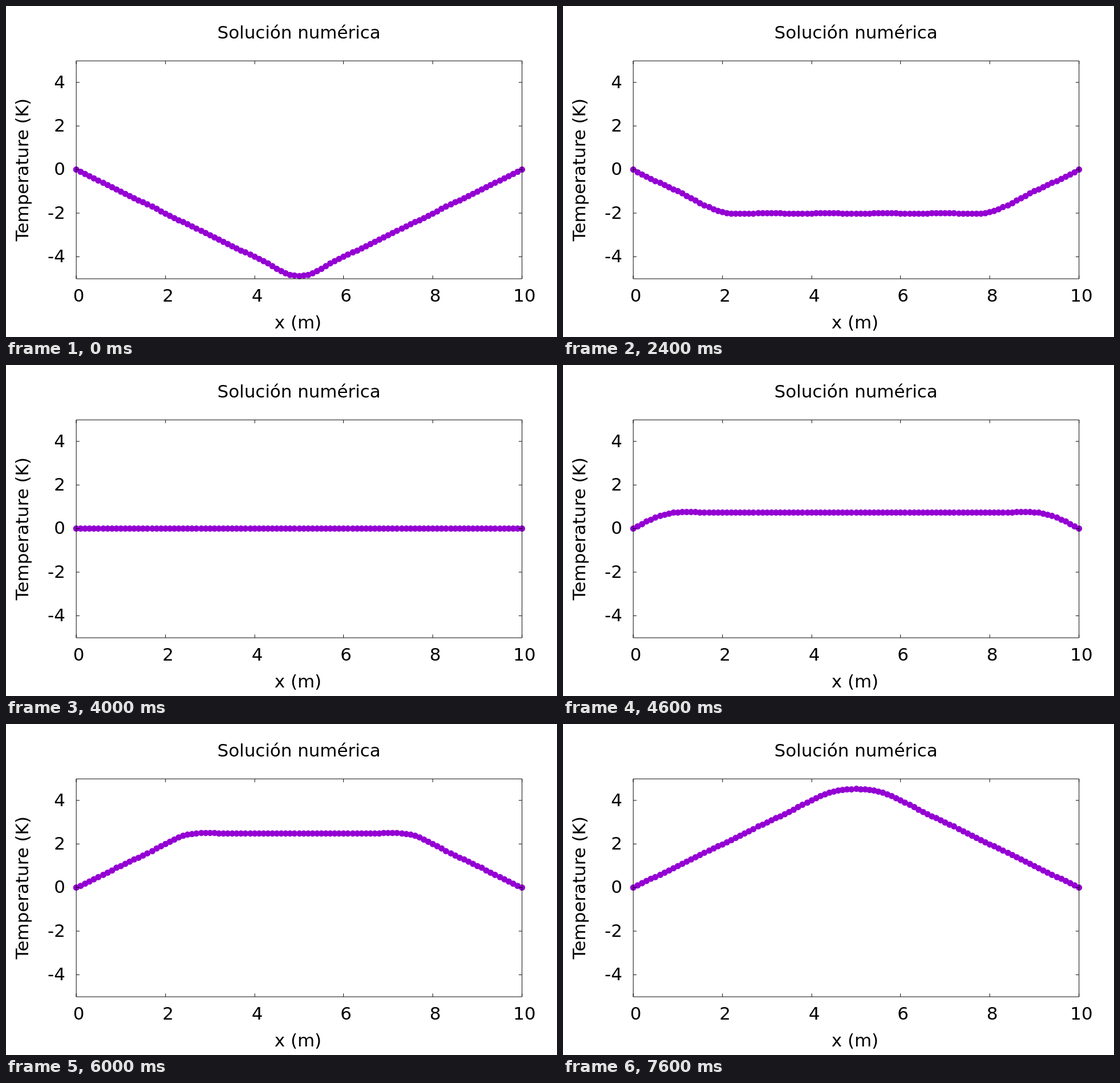
These frames come from a looping animation (966 px wide and 580 px high, 7.8 s). An HTML page:

```html
<!DOCTYPE html>
<html lang="es">
<head>
<meta charset="utf-8">
<title>Solución numérica</title>
<style>
  html, body { margin: 0; width: 100%; height: 100%; overflow: hidden; background: #fff; }
  svg { display: block; }
  text { font: 32px "DejaVu Sans", sans-serif; fill: #000; text-anchor: middle; }
  #dots { fill: #9400d3; }
  #axes { fill: none; stroke: #000; stroke-width: 1; }
</style>
</head>
<body>
<svg width="966" height="580" viewBox="0 0 1000 600" preserveAspectRatio="none">
  <g id="dots"></g>
  <path id="axes"/>
  <g id="labels"></g>
</svg>
<script>
const SVG = "http://www.w3.org/2000/svg";
const LEFT = 127.5, RIGHT = 936.5, TOP = 99.5, BOTTOM = 494.5;
const LENGTH = 10, POINTS = 101, LAST_MODE = 15;
const STEP_MS = 200, STEPS = 39, STEP_TIME = 0.25;

// Plot coordinates snap to whole pixels of the 1000 x 600 canvas.
const byId = id => document.getElementById(id);
const mapX = x => LEFT + Math.round(x * (RIGHT - LEFT) / LENGTH);
const mapY = v => BOTTOM - Math.floor((v + 5) * (BOTTOM - TOP) / 10 + 0.5);

function add(parent, tag, attrs, content = "") {
  const node = document.createElementNS(SVG, tag);
  for (const key in attrs) node.setAttribute(key, attrs[key]);
  node.textContent = content;
  parent.appendChild(node);
  return node;
}

function drawAxes() {
  const labels = byId("labels");
  let path = `M${LEFT} ${TOP}H${RIGHT}V${BOTTOM}H${LEFT}Z`;
  for (let x = 0; x <= 10; x += 2) {
    const px = mapX(x);
    path += `M${px} ${BOTTOM}v-6M${px} ${TOP}v6`;
    add(labels, "text", { x: px + 4.5, y: 536 }, x);
  }
  for (let v = -4; v <= 4; v += 2) {
    const py = mapY(v);
    path += `M${LEFT} ${py}h6M${RIGHT} ${py}h-6`;
    add(labels, "text", { x: LEFT - 20, y: py + 10, style: "text-anchor:end" }, v);
  }
  byId("axes").setAttribute("d", path);
  add(labels, "text", { x: 531.7, y: 59 }, "Solución numérica");
  add(labels, "text", { x: 530, y: 584.5 }, "x (m)");
  add(labels, "text", { transform: "translate(40.5 297) rotate(-90)" }, "Temperature (K)");
}

// Plucked string: truncated Fourier series of a triangular profile.
function wave(x, t) {
  let sum = 0;
  for (let n = 1, sign = -1; n <= LAST_MODE; n += 2, sign = -sign) {
    sum += sign * 40 / (n * n * Math.PI * Math.PI)
      * Math.sin(n * Math.PI * x / LENGTH) * Math.cos(n * Math.PI * t / LENGTH);
  }
  return sum;
}

drawAxes();
const dots = Array.from({ length: POINTS }, (_, i) =>
  add(byId("dots"), "circle", { cx: mapX(i / 10), r: 5.7 }));

let shown = -1;
function render(ms) {
  const step = Math.floor(ms / STEP_MS) % STEPS;
  if (step === shown) return;
  shown = step;
  dots.forEach((dot, i) => dot.setAttribute("cy", mapY(wave(i / 10, step * STEP_TIME))));
}

const start = performance.now();
function tick() {
  render(performance.now() - start);
  requestAnimationFrame(tick);
}
tick();
</script>
</body>
</html>
```
